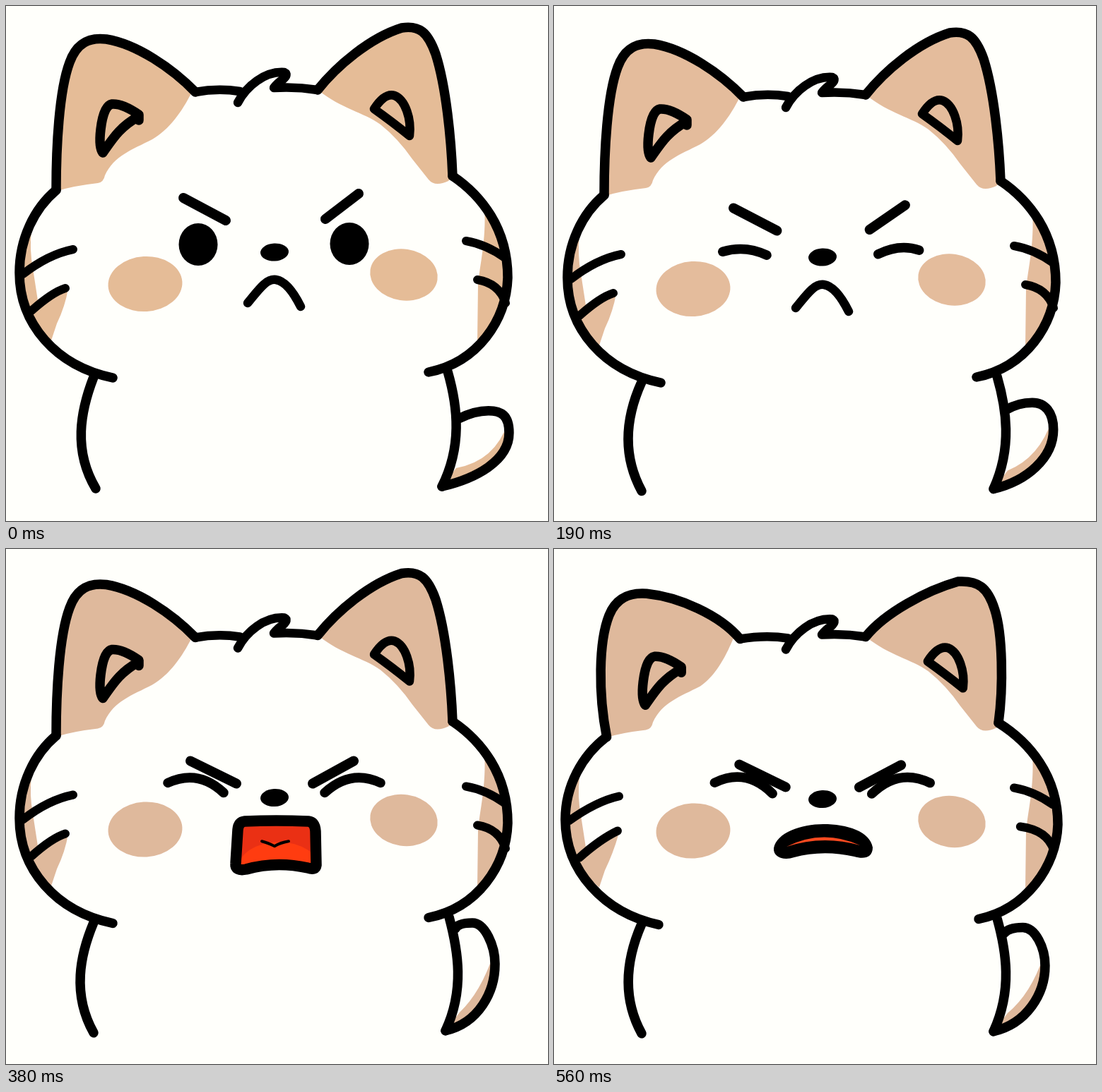
Recreate the animation shown at these times as an HTML page with a canvas. Size 767 by 730 pixels, loop 630 ms.

```html
<!DOCTYPE html>
<html>
<head>
<meta charset="utf-8">
<style>
html, body { margin: 0; width: 100%; height: 100%; overflow: hidden; background: #fffffb; }
canvas { display: block; }
</style>
</head>
<body>
<canvas id="stage" width="767" height="730"></canvas>
<script>
const ctx = document.getElementById('stage').getContext('2d');
const LOOP = 630;

// start ms, head drop, ear splay, frown amount, tail lift, eye height (0 = shut), mouth, mouth values
const poses = [
  [0, 0, 0, 0, .05, 30, 'frown'],
  [60, -2, 0, 0, 0, 30, 'frown'],
  [130, 2, 0, .12, .1, 17, 'frown'],
  [190, 7, 0, .3, .3, 0, 'frown'],
  [250, 9, 0, .65, .6, 0, 'open', 393, 452],
  [310, 9, 0, .87, .8, 0, 'open', 390, 463],
  [380, 3.5, 0, 1, 1, 0, 'open', 386, 454],
  [440, 2, 4, 1.05, 1.04, 0, 'open', 388, 442],
  [500, 3.5, 8, 1.1, .97, 0, 'crescent', 0, 4],
  [560, 5.5, 12, 1.12, .86, 0, 'crescent', 3, 6]
];

const mix = (a, b, t) => a.map((v, i) => v + (b[i] - v) * t);

function line(d, width = 13.5) {
  ctx.lineWidth = width;
  ctx.stroke(new Path2D(d));
}

function fill(d, color) {
  ctx.fillStyle = color;
  ctx.fill(new Path2D(d));
}

function oval(x, y, rx, ry, color = '#000', turn = 0) {
  ctx.fillStyle = color;
  ctx.beginPath();
  ctx.ellipse(x, y, rx, ry, turn, 0, 7);
  ctx.fill();
}

function drawBody(drop, lean, lift, tan) {
  const low = drop / 2;
  const [sx, sy, tx, ty, rx, ry] = mix([642, 587, 684, 576, 713, 606], [636, 538, 660, 530, 692, 588], lift);
  const ex = 617 + 5 * lean, ey = 681 + low;
  const outer = `C${rx} ${ry + 40} ${ex + 47} ${ey - 11} ${ex} ${ey}`;
  fill(`M${rx - 2} ${ry - 14}L${rx} ${ry}${outer}L${ex + 20} ${ey - 26}Q${rx - 20} ${ry + 40} ${rx - 2} ${ry - 14}`, tan);
  line(`M${sx} ${sy}Q${tx - 20} ${ty} ${tx} ${ty}C${tx + 18} ${ty} ${rx} ${ry - 25} ${rx} ${ry}${outer}`);
  line(`M124 ${526 + drop}C105 575 ${95 - 2 * lean} 630 ${127 - 3 * lean} ${684 + low}`);
  line(`M${625 + 2 * lean} ${518 + drop}C640 570 ${645 + 4 * lean} 625 ${ex} ${ey}`);
}

function drawEars(k, tan) {
  const left = `M${71 + k * .3} 261C${71 - k * .7} 200 ${75 - k} ${120 + k * .5} ${90 - k} ${80 + k * .7}`
    + `C${100 - k} ${52 + k} ${118 - k} ${44 + k} ${142 - k * .9} ${47 + k * .9}C${185 - k * .7} ${54 + k * .7} 235 88 ${268 - k * .4} 122`;
  const right = `M441 119C468 85 ${515 + k} ${45 + k * .7} ${560 + k} ${31 + k * .8}`
    + `C${585 + k * 1.3} ${27 + k} ${597 + k * 1.4} ${37 + k} ${608 + k * 1.3} ${68 + k}C${623 + k} 115 ${630 + k * .5} 190 ${632 - k * .25} 241`;
  fill(left + `L${263 - k * .8} 122C${249 - k * .6} 150 ${231 - k * .3} 175 207 189C178 204 153 212 140 240Q138 250 130 251Q95 255 73 262Z`, tan);
  fill(right + 'L626 248Q607 257 598 246L575 217Q555 188 530 168C505 150 475 146 443 120Z', tan);
  line(left);
  line(right);
  line(`M${268 - k * .4} 122Q300 116 331 121`, 12.5);
  line('M328 137C340 114 366 92 394 94Q400 97 392 104Q384 109 379 116Q410 114 441 119', 12.5);

  const shift = k * .65;
  ctx.save();
  ctx.translate(-shift, shift);
  line('M188 162L188 154Q165 138 150 139Q138 141 134 175Q131 200 137 208C150 190 160 172 187 157');
  ctx.translate(2 * shift, 0);
  line('M521 146C530 132 540 124 550 127C565 133 574 160 571 184Q545 163 521 146Z', 12.5);
  ctx.restore();
}

function drawSides(k, tan) {
  const out = k * .25;
  fill(`M36 318Q33 345 38 372L46 424L${88 + out} 400Q84 425 72 450L64 474C40 455 ${20 - out} 420 ${19 - out} 380Q20 345 36 318`, tan);
  fill(`M677 286C680 330 670 370 668 395L667 476C695 450 ${711 + out} 410 ${710 + out} 370Q706 320 677 286`, tan);
  line(`M${71 + out} 261C40 287 ${19 - out} 330 ${19 - out} 378C${19 - out} 450 70 510 ${151 - out} 527`);
  line(`M${632 - out} 241C672 268 ${710 + out} 315 ${710 + out} 385C${708 + out} 445 668 505 ${598 + out} 519`);
  line(`M${95 - out} 345Q60 352 ${24 - out} 380`, 12);
  line(`M${84 + k * .5} ${400 - k * .5}Q65 406 36 432`, 12);
  line('M651 333Q680 338 706 357', 12);
  line(`M${667 - k * .6} 388Q698 393 707 421`, 12);
}

function drawEyes(frown, height) {
  const curve = (a, b) => {
    const [x, y, cx, cy, ex, ey] = mix(a, b, frown);
    line(`M${x} ${y}Q${cx} ${cy} ${ex} ${ey}`);
  };
  const brow = (a, b) => {
    const [x, y, ex, ey] = mix(a, b, frown);
    line(`M${x} ${y}L${ex} ${ey}`, 14);
  };
  brow([251, 272, 311, 304], [261, 297, 326, 329]);
  brow([499, 266, 452, 302], [492, 297, 434, 329]);
  if (height) {
    oval(272, 338, 27.5, height);
    oval(486, 337, 27.5, height);
  } else {
    curve([243, 347, 270, 342, 298, 348], [229, 328, 272, 308, 308, 342]);
    curve([462, 346, 490, 339, 511, 344], [451, 342, 488, 308, 530, 328]);
  }
}

function drawOpenMouth(top, bottom) {
  const shape = `M338 ${top}Q382 ${top - 2} 428 ${top}Q437 ${top + 1} 438 ${top + 14}L439 ${bottom - 6}`
    + `Q438 ${bottom + 2} 427 ${bottom - 2}Q382 ${bottom - 12} 340 ${bottom}Q324 ${bottom + 3} 325 ${bottom - 8}`
    + `L328 ${top + 12}Q329 ${top + 1} 338 ${top}Z`;
  const mid = top + (bottom - top) * .43;
  ctx.save();
  ctx.clip(new Path2D(shape));
  fill(shape, '#ea3014');
  oval(386, bottom, 58, bottom - mid, '#ff3c10');
  ctx.restore();
  line(`M362 ${mid - 1}Q370 ${mid + 1} 380 ${mid + 6}Q388 ${mid + 1} 400 ${mid - 1}`, 4);
  line(shape, 15.5);
}

function drawCrescentMouth(y, thin) {
  ctx.save();
  ctx.translate(0, y);
  fill('M311 421C315 399 350 387 381 387C415 387 447 397 451 420C451 435 438 437 425 433C395 426 365 427 340 434C325 439 310 434 311 421Z', '#000');
  fill(`M329 419Q380 393 433 417Q380 ${405 - thin / 2} 329 419`, '#fa4a20');
  ctx.restore();
}

function draw(time) {
  const [start, drop, splay, frown, lift, eye, mouth, a, b] = poses.findLast(p => p[0] <= time);
  const tan = start < 190 ? '#e5bc97' : start < 250 ? '#e4bc9c' : '#dfb99c';
  ctx.fillStyle = '#fffffb';
  ctx.fillRect(0, 0, 767, 730);
  ctx.strokeStyle = '#000';
  ctx.lineCap = ctx.lineJoin = 'round';
  drawBody(drop, eye === 30 ? 0 : eye ? .5 : 1, lift, tan);

  ctx.save();
  ctx.translate(0, drop);
  drawEars(splay, tan);
  drawSides(splay, tan);
  oval(197, 394, 52.5, 39, tan, -.06);
  oval(563, 381, 48, 36.5, tan, .15);
  drawEyes(frown, eye);
  oval(380, 349, 20, 12.5, '#000', -.05);
  if (mouth === 'frown') line('M342 421C357 403 368 386 382 388C396 390 408 408 417 426', 12.5);
  ctx.restore();

  if (mouth === 'open') drawOpenMouth(a, b);
  if (mouth === 'crescent') drawCrescentMouth(a, b);
}

function tick() {
  draw(performance.now() % LOOP);
  requestAnimationFrame(tick);
}
tick();
</script>
</body>
</html>
```
